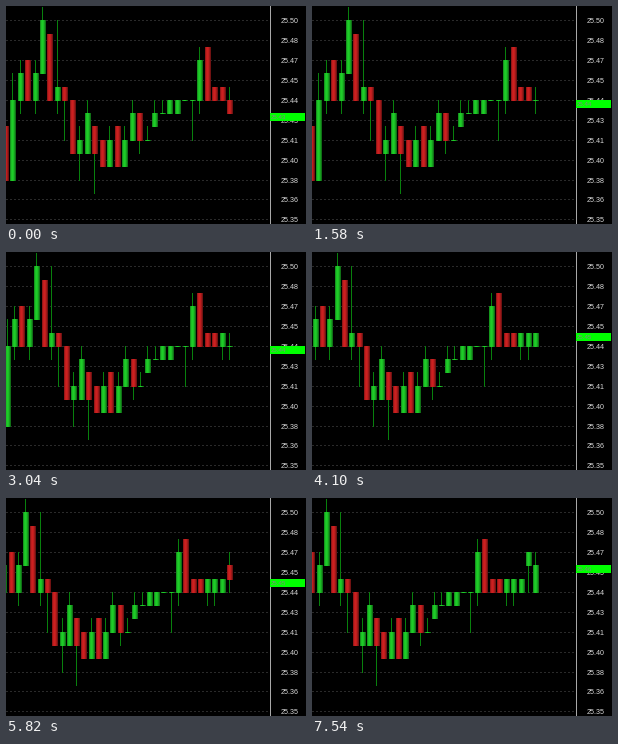
A matplotlib script for the animation above (8 s loop, 300 px wide and 218 px high).

```python
import numpy as np
import matplotlib.pyplot as plt
from matplotlib.animation import FuncAnimation
from matplotlib.collections import PolyCollection
from matplotlib.patches import Rectangle

W, H, DPI = 300, 218, 100
STEP, LOOP = 20, 8000
AXIS_X, LAST_X, BODY_W = 264, 221, 6

# Prices are in cents above 25. A candle opens at the previous close,
# one cent above or below it where the price gaps.
CLOSES = [38, 44, 46, 44, 46, 50, 44, 45, 44, 40, 41, 43, 40, 39, 41,
          39, 41, 43, 41, 41, 43, 43, 44, 44, 44, 44, 47, 44, 44, 44]
GAP_UP = (3, 13, 15, 20, 27, 28, 29)
GAP_DOWN = (6, 11, 12, 23)
SPIKES = {1: 46, 7: 50, 8: 41, 10: 38, 12: 37, 18: 40, 25: 41}
LEVEL = 44  # caps the rises below it, is undercut by the rises above it

# Times at which the price ticks by one cent, and at which a candle is added
UPS = (60, 920, 1320, 2180, 3240, 4100, 4760, 5360, 5820, 6680, 7280)
DOWNS = (260, 1580, 3040, 3900, 5160, 5160, 5620, 6020)
SCROLLS = (1780, 4100, 5820, 7540)
LIVE_OPENS = (44, 44, 44, 46, 44)

LABELS = (50, 48, 47, 45, 44, 43, 41, 40, 38, 36, 35)
GREEN, RED = np.array([30, 205, 40]) / 255, np.array([205, 32, 32]) / 255
WICK = (0.03, 0.5, 0.05)


def history():
    """Closed candles as (open, close, high, low), oldest first."""
    out, prev = [], 42
    for i, close in enumerate(CLOSES):
        start = prev + (i in GAP_UP) - (i in GAP_DOWN)
        high, low = max(start, close), min(start, close)
        if close >= start:
            high += close != LEVEL
            low -= start == LEVEL and close > start
        spike = SPIKES.get(i, close)
        out.append((start, close, max(high, spike), min(low, spike)))
        prev = close
    return out


def live(k, price=None):
    high, low = (45 if k < 3 else 47), (43 if k < 2 else 44)
    return LIVE_OPENS[k], price or high, high, low


def passed(times, t):
    return sum(t >= s for s in times)


def price_y(cents):
    return int(14.8 + (50 - cents) * 13.27)


def box(x, y, w, h):
    return [(x, y), (x + w, y), (x + w, y + h), (x, y + h)]


def shade(base, j):
    """Colour of body column j: lit left of the middle, dark at the edges."""
    return base * (0.3 + 0.7 * np.sin(np.pi * ((j + 1) / (BODY_W + 1)) ** 0.8))


fig = plt.figure(figsize=(W / DPI, H / DPI), dpi=DPI, facecolor="black")
ax = fig.add_axes([0, 0, 1, 1])
ax.set_xlim(0, W)
ax.set_ylim(H, 0)
ax.axis("off")


def text(x, y, label, size_px, color, z):
    return ax.text(x, y, label, fontsize=size_px * 72 / DPI, color=color,
                   family="Liberation Sans", va="center_baseline", zorder=z)


def polys(rects, colors, z):
    return ax.add_collection(PolyCollection(
        rects, facecolors=colors, edgecolors="none", antialiaseds=False,
        zorder=z))


rows = [int(14.8 + i * 19.9) for i in range(len(LABELS))]
polys([box(x, y, 2, 1) for y in rows for x in range(0, AXIS_X, 4)],
      "#2a2a2a", 1)
polys([box(AXIS_X, 0, 1, H)], "#a8a8a8", 3)
for y, cents in zip(rows, LABELS):
    text(275, y + 0.5, f"25.{cents}", 7.1, "#d8d8d8", 4)

chart = polys([], "black", 2)
marker = ax.add_patch(Rectangle((AXIS_X, 0), 35, 8, fc="#00ff00", ec="none",
                                antialiased=False, zorder=5))
quote = text(265, 0, "", 6.2, "#7c8c7c", 6)
CLOSED = history()


def draw(frame):
    t = frame * STEP
    count = passed(SCROLLS, t)
    price = 43 + passed(UPS, t) - passed(DOWNS, t)
    gap = 7.48 - 0.066 * count
    candles = CLOSED + [live(k) for k in range(count)] + [live(count, price)]

    rects, colors = [], []
    for i, (start, close, high, low) in enumerate(reversed(candles)):
        x = round(LAST_X - i * gap)
        top, bottom = price_y(max(start, close)), price_y(min(start, close))
        tip, foot = min(top, price_y(high)), max(bottom, price_y(low))
        rects.append(box(x + 2, tip, 1, foot - tip + 1))
        colors.append(WICK)
        base = GREEN if close >= start else RED
        for j in range(BODY_W):
            rects.append(box(x + j, top, 1, bottom - top + 1))
            colors.append(shade(base, j))
    chart.set_verts(rects)
    chart.set_facecolor(colors)

    y = price_y(price)
    marker.set_y(y)
    quote.set_position((265, y + 4))
    quote.set_text(f"25.{price}")
    return chart, marker, quote


anim = FuncAnimation(fig, draw, frames=LOOP // STEP, interval=STEP,
                     repeat=True, repeat_delay=0, blit=False)
plt.show()
```
